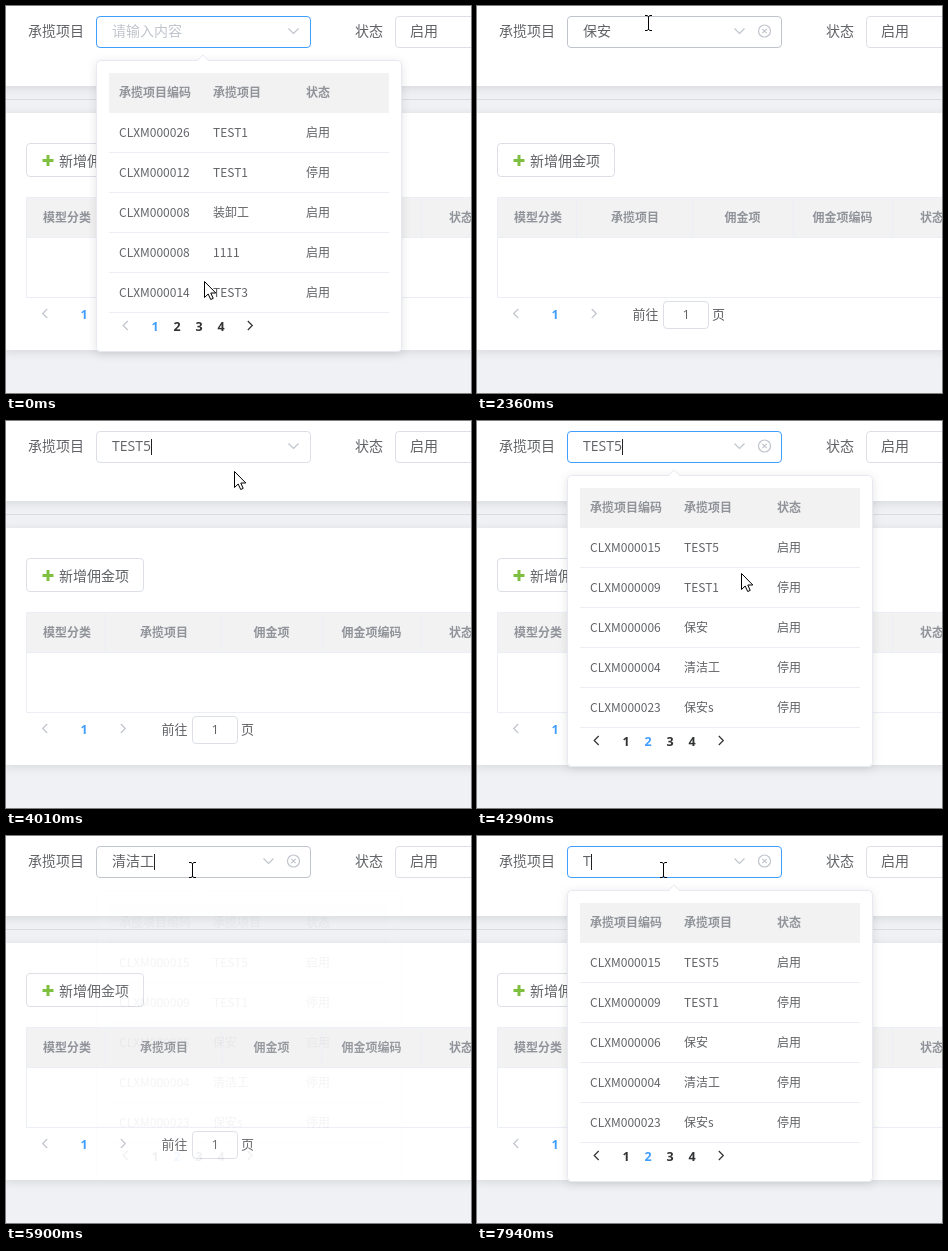
Recreate the animation shown at these times as an HTML page. Size 465 by 387 pixels, loop 8 s.

```html
<!DOCTYPE html>
<html lang="zh-CN">
<head>
<meta charset="utf-8">
<style>
html, body { margin: 0; width: 100%; height: 100%; overflow: hidden; background: #f0f1f5; }
svg { display: block; width: 465px; height: 387px; }
text { font: 14px "Open Sans", "Noto Sans CJK SC", "Noto Sans CJK", sans-serif; fill: #606266; white-space: pre; }
text.cell { font: 12px "Noto Sans CJK SC", "Noto Sans CJK", sans-serif; }
text.head { font-size: 12px; font-weight: 700; fill: #909399; }
text.num { font-size: 12.5px; font-weight: 700; text-anchor: middle; }
text.small { font-size: 13px; }
.box { fill: #fff; stroke: #dcdfe6; }
.line { fill: none; stroke: #ebeef5; }
.icon { fill: none; stroke: #c0c4cc; stroke-width: 1.2; }
</style>
</head>
<body>
<svg viewBox="0 0 465 387">
  <defs>
    <filter id="soft" x="-10%" y="-10%" width="120%" height="125%">
      <feDropShadow dx="0" dy="2" stdDeviation="5" flood-color="#000" flood-opacity=".11"/>
    </filter>
  </defs>
  <rect width="465" height="387" fill="#f0f1f5"/>
  <rect x="-20" y="-20" width="520" height="100" rx="4" fill="#fff" filter="url(#soft)"/>
  <path d="M0 93.5H465" stroke="#d8dbe2"/>
  <rect x="-2" y="107" width="500" height="237" rx="4" fill="#fff" filter="url(#soft)"/>
  <g id="page"></g>
  <g id="field">
    <rect id="frame" class="box" x="90.5" y="10.5" width="214" height="31" rx="3.5"/>
    <text id="value" x="106" y="30"></text>
    <rect id="caret" y="18" width="1" height="16" fill="#222"/>
    <path id="arrow" class="icon" d="M-5 -2.5L0 2.5L5 -2.5"/>
    <g id="clear" class="icon">
      <circle cx="287.5" cy="25" r="6"/>
      <path d="M285.3 22.8l4.4 4.4m0 -4.4l-4.4 4.4"/>
    </g>
  </g>
  <g id="popup">
    <rect x="90.5" y="54.5" width="305" height="291" rx="4" fill="#fff" stroke="#e6e9f0" filter="url(#soft)"/>
    <path d="M191 55L197 49L203 55" fill="#fff" stroke="#e6e9f0"/>
    <path d="M191 55.5H203" stroke="#fff"/>
    <rect x="103" y="67" width="280" height="40" fill="#f2f2f2"/>
    <rect id="hover" x="103" width="280" height="39" fill="#f5f7fa"/>
    <g id="grid"></g>
  </g>
  <g id="pointer" stroke="#000" fill="#fff" stroke-linejoin="round">
    <path id="arrowCur" d="M.5 .5V16.5L4.2 13L6.7 18.5L9.2 17.4L6.8 12H11.8Z"/>
    <path id="handCur" stroke-width="1.2" d="M-1.5 14V1.5A1.5 1.5 0 0 1 1.5 1.5V8Q3 6.5 4.5 8.5Q6.5 7.5 7.5 9.5Q10 9 10.5 11.5V16L8.5 20V23.5H-1V20.5L-5.5 14Q-6.8 11.2 -4.5 11.2Q-3 11.7 -1.5 14ZM1.5 8V12M4.5 8.5V12M7.5 9.5V12.5"/>
    <path id="beamCur" fill="none" d="M-3 -7.5H-1L.5 -6.5L2 -7.5H4M.5 -6.5V7M-3 7.5H-1L.5 6.5L2 7.5H4"/>
  </g>
</svg>
<script>
const $ = id => document.getElementById(id);
const LOOP = 8000, STEP = 118, FADE = 240, BLINK = 530;
const BLUE = '#409eff', DARK = '#303133', PALE = '#c0c4cc';

function add(parent, tag, attrs, content = '') {
  const el = document.createElementNS('http://www.w3.org/2000/svg', tag);
  for (const k in attrs) el.setAttribute(k, attrs[k]);
  el.textContent = content;
  parent.append(el);
  return el;
}
const label = (g, x, y, s, cls = '') => add(g, 'text', { x, y, class: cls }, s);
const box = (x, y, width, height) => add($('page'), 'rect', { x, y, width, height, rx: 3.5, class: 'box' });
const chevron = (g, x, y, dir) =>
  add(g, 'path', { d: `M${x - 2.2 * dir} ${y - 4.5}l${4.5 * dir} 4.5l${-4.5 * dir} 4.5`, class: 'icon' });

// page behind the popup
const page = $('page');
label(page, 22, 30, '承揽项目');
label(page, 349, 30, '状态');
box(389.5, 10.5, 214, 31);
label(page, 404, 30, '启用');
box(20.5, 137.5, 117, 33);
add(page, 'path', { d: 'M36.5 154.5h11m-5.5 -5.5v11', stroke: '#7fbf3f', 'stroke-width': 3 });
label(page, 53, 160, '新增佣金项');
add(page, 'rect', { x: 20, y: 191, width: 460, height: 40, fill: '#f2f2f3' });
add(page, 'path', { d: 'M480 191.5H20.5V291.5H480M20 231.5H480M99.5 191v40M215.5 191v40M316.5 191v40M415.5 191v40', class: 'line' });
[[37, '模型分类'], [134, '承揽项目'], [247.5, '佣金项'], [335.5, '佣金项编码'], [443, '状态']]
  .forEach(([x, s]) => label(page, x, 216, s, 'head'));
chevron(page, 39, 307.5, -1);
chevron(page, 117, 307.5, 1);
label(page, 78, 312.5, '1', 'num').style.fill = BLUE;
label(page, 155.5, 313, '前往', 'small');
box(186.5, 295.5, 45, 27);
label(page, 205.5, 313, '1', 'small');
label(page, 235, 313, '页', 'small');

// popup grid
const pages = [
  '26 TEST1 启用,12 TEST1 停用,08 装卸工 启用,08 1111 启用,14 TEST3 启用',
  '15 TEST5 启用,09 TEST1 停用,06 保安 启用,04 清洁工 停用,23 保安s 停用'
].map(p => p.split(',').map(r => ('CLXM0000' + r).split(' ')));
const grid = $('grid'), colX = [113, 207, 300];
['承揽项目编码', '承揽项目', '状态'].forEach((s, i) => label(grid, colX[i], 91, s, 'head'));
const cells = pages[0].map((_, r) => {
  const y = 131 + 40 * r;
  add(grid, 'path', { d: `M103 ${y + 15.5}H383`, class: 'line' });
  return colX.map(x => label(grid, x, y, '', 'cell'));
});
const prev = chevron(grid, 119.5, 319.5, -1);
chevron(grid, 244, 319.5, 1).style.stroke = DARK;
const numX = i => 149 + 22 * i;
const nums = [0, 1, 2, 3].map(i => label(grid, numX(i), 324.5, i + 1, 'num'));

// what the user does: time, action, argument
const events = [
  [-600, 'open'], [700, 'turn', 1],
  [2100, 'pick', 2], [2560, 'open'],
  [3700, 'pick', 0], [3970, 'open'],
  [4820, 'pick', 3], [5885, 'open'],
  [6830, 'type', '清'], [6980, 'type', ''], [7940, 'type', 'T']
];
const actions = {
  open: (s, t) => Object.assign(s, { open: true, focus: true, toggled: t }),
  turn: (s, t, n) => Object.assign(s, { page: n, focus: false }),
  pick: (s, t, row) => Object.assign(s, { value: pages[s.page][row][1], open: false, focus: false, toggled: t }),
  type: (s, t, text) => Object.assign(s, { value: text })
};

function stateAt(t) {
  const s = { value: '', page: 0, row: -1 };
  for (const [at, action, arg] of events) {
    if (action === 'pick' && Math.abs(t - at) < 200) s.row = arg;
    if (at > t) continue;
    actions[action](s, at, arg);
    s.since = at;
  }
  return s;
}

// pointer moves: begin, end, destination
const moves = [
  [120, 590, 173, 313], [900, 1150, 187, 311], [1340, 1930, 232, 187],
  [2100, 2350, 171, 17], [2600, 3500, 199, 129], [3740, 3960, 236, 28],
  [4060, 4240, 264, 152], [4360, 4700, 234, 245], [4900, 5640, 186, 34]
];
const clamp = v => Math.min(1, Math.max(0, v));
const ease = p => p * p * (3 - 2 * p);

function pointerAt(t) {
  let x = 198, y = 275;
  for (const [a, b, tx, ty] of moves) {
    const p = ease(clamp((t - a) / (b - a)));
    x += (tx - x) * p;
    y += (ty - y) * p;
  }
  return { x, y, beam: y < 42, hand: y > 306 };
}
const show = (el, on) => el.style.display = on ? '' : 'none';

function draw(t) {
  const tick = t - t % STEP;
  const s = stateAt(t), { x, y, beam, hand } = pointerAt(tick);
  const p = clamp((tick - s.toggled) / FADE), alpha = s.open ? p : 1 - p;

  $('frame').style.stroke = s.focus && alpha > .1 ? BLUE : beam ? PALE : '#dcdfe6';
  const value = $('value');
  value.textContent = s.value || '请输入内容';
  value.style.fill = s.value ? '#606266' : PALE;
  const width = s.value ? value.getComputedTextLength() : 0;
  $('caret').setAttribute('x', Math.round(106 + width));
  show($('caret'), s.focus && (t - s.since) % (2 * BLINK) < BLINK);

  // the clear icon lingers after the pointer leaves
  const clear = s.value && (beam || pointerAt(t - 200).beam);
  show($('clear'), clear);
  $('arrow').setAttribute('transform', `translate(${clear ? 262.5 : 287.5} 25)`);

  $('popup').style.opacity = alpha;
  show($('hover'), s.row >= 0);
  $('hover').setAttribute('y', 107 + 40 * s.row);
  pages[s.page].forEach((row, r) => row.forEach((v, c) => cells[r][c].textContent = v));
  nums.forEach((n, i) => {
    const lit = i === s.page || hand && Math.abs(x - numX(i)) < 11;
    n.style.fill = lit ? BLUE : DARK;
  });
  prev.style.stroke = s.page ? DARK : PALE;

  $('pointer').setAttribute('transform', `translate(${Math.round(x)} ${Math.round(y)})`);
  show($('beamCur'), beam);
  show($('handCur'), hand);
  show($('arrowCur'), !beam && !hand);
}

const start = performance.now();
function loop() {
  draw((performance.now() - start) % LOOP);
  requestAnimationFrame(loop);
}
loop();
</script>
</body>
</html>
```
